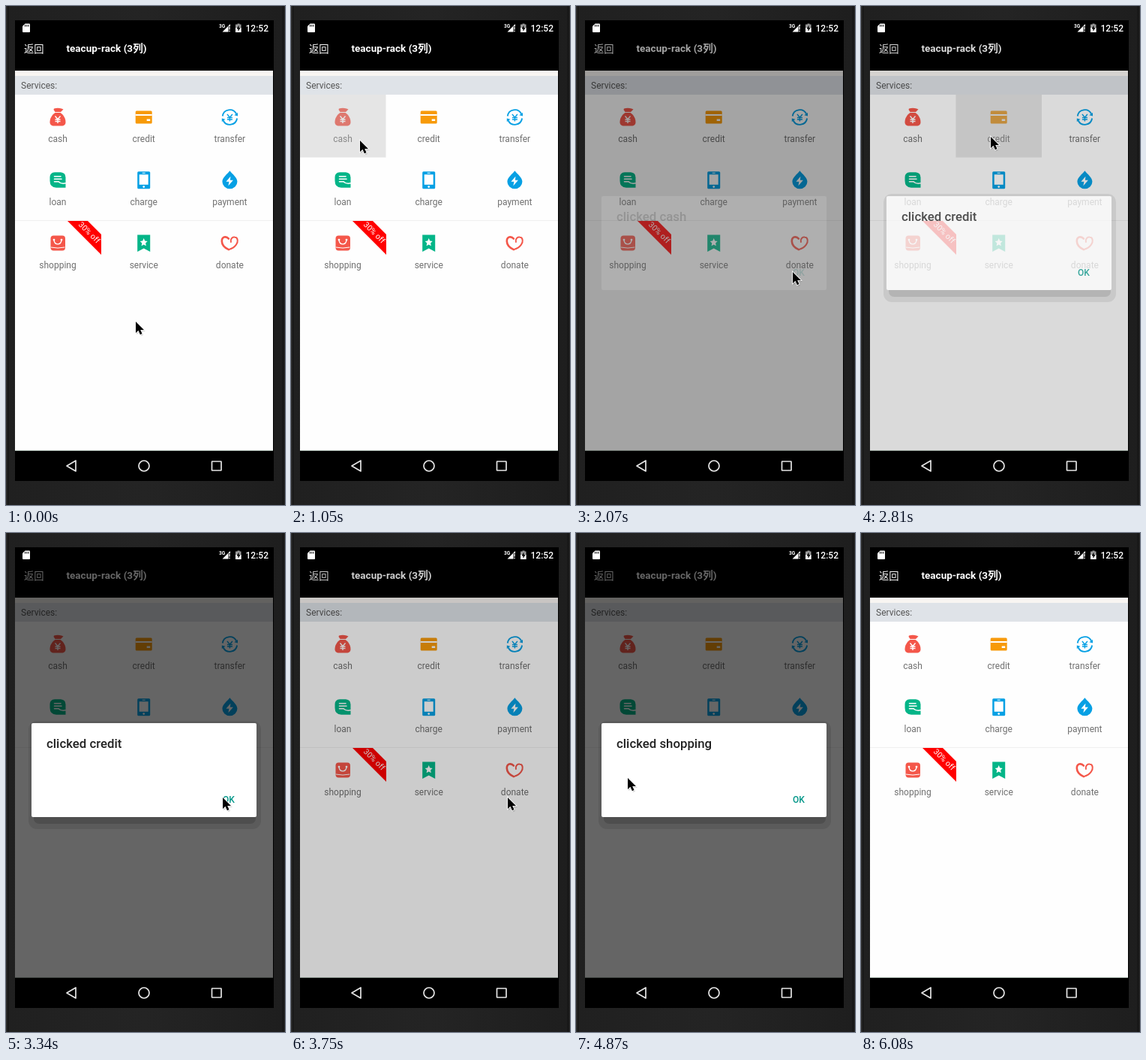
Animation, 372 px wide and 664 px high, one loop 6.44 s. Source, as an HTML page:

```html
<!DOCTYPE html>
<html lang="en">
<head>
<meta charset="utf-8">
<title>Grid demo</title>
<style>
html, body { margin: 0; width: 100%; height: 100%; overflow: hidden; background: #1f1f1f; }
svg { display: block; width: 372px; height: 664px; font-family: Roboto, sans-serif; }
.label { font-size: 12px; fill: #707070; text-anchor: middle; }
.cjk { font-family: "Noto Sans CJK SC", "Noto Sans CJK", sans-serif; }
.red { fill: #f4574a; }
.orange { fill: #f79a0a; }
.blue { fill: #06a0e4; }
.green { fill: #04b588; }
.white { fill: #fff; }
.line { fill: none; stroke: #fff; stroke-linecap: round; }
.medium { font-weight: 500; }
</style>
</head>
<body>
<svg viewBox="0 0 372 664">
  <defs>
    <linearGradient id="bezel">
      <stop offset="0" stop-color="#2a2a2a"/>
      <stop offset=".004" stop-color="#2a2a2a"/>
      <stop offset=".006" stop-color="#101010"/>
      <stop offset=".01" stop-color="#202020"/>
      <stop offset=".5" stop-color="#242424"/>
      <stop offset=".988" stop-color="#1e1e1e"/>
      <stop offset=".994" stop-color="#141414"/>
      <stop offset="1" stop-color="#2a2a2a"/>
    </linearGradient>
    <path id="yen" d="M-3.5-4.5L0-.3 3.5-4.5M0-.3V5M-3.5 0H3.5M-3.5 2.5H3.5" fill="none" stroke-width="1.4"/>
  </defs>

  <rect width="372" height="664" fill="url(#bezel)"/>
  <rect x="12" y="19" width="345" height="613"/>

  <!-- status bar -->
  <path class="white" d="M25.5 23.5H31q1 0 1 1v9.500q0 1-1 1H23q-1 0-1-1V27z"/>
  <path d="M25.500 25v2.500M27.700 25v2.500M29.900 25v2.500" stroke="#000" stroke-width="1"/>
  <text class="white" x="284" y="29" font-size="6.500" font-weight="700">3G</text>
  <path d="M299 24v10.500H288.500z" fill="#fff"/>
  <path d="M296.500 27h3v8h-3z"/>
  <path d="M298 27.500v4M298 32.800v1.500" stroke="#fff" stroke-width="1.300"/>
  <path d="M308.500 23.500h3v1h2v10.500h-7.500V24.500h2.500z" fill="#999"/>
  <path d="M306 29h7.500v6H306z" fill="#fff"/>
  <path d="M310.500 25.500l-3 5h2v3.500l3-5h-2z"/>
  <text class="white medium" x="319.500" y="34" font-size="12">12:52</text>

  <!-- app header and list -->
  <text class="white cjk" x="24" y="61.500" font-size="13.300" lang="zh">返回</text>
  <text class="white" x="80.500" y="61" font-size="13.500" font-weight="700">teacup-rack (3<tspan class="cjk">列</tspan>)</text>
  <rect x="12" y="86" width="344" height="506" fill="#fefefe"/>
  <rect x="12" y="86" width="344" height="7" fill="#f8f5f2"/>
  <rect x="12" y="93" width="344" height="25" fill="#dfe3e8"/>
  <text x="20" y="110" font-size="12" fill="#555">Services:</text>
  <rect x="12" y="285" width="344" height="1" fill="#efefef"/>
  <rect x="12" y="591" width="344" height="1" fill="#b8c6bd"/>

  <!-- icons, each drawn around its own centre -->
  <g id="icons">
    <g>
      <path class="red" d="M-5-11.500Q0-13 5-11.500L7.500-10.500 4-7H-3.500L-5.500-10z"/>
      <path class="red" d="M-3.500-6H3.500C8-3 10.500 2 10.500 6.500 10.500 10 8.500 11.500 5 11.500H-5C-8.500 11.500-10.500 10-10.500 6.500-10.500 2-8-3-3.500-6z"/>
      <use href="#yen" y="3" stroke="#fff"/>
    </g>
    <g>
      <rect class="orange" x="-11" y="-8.500" width="22" height="17" rx="1.500"/>
      <path class="white" d="M-11-4H11v2H-11zM4 2.500H8.500v2.500H4z"/>
    </g>
    <g stroke="#06a0e4">
      <path d="M-9.700-1.500A9.800 9.800 0 0 1 8.700-4.500M9.700 1.500A9.800 9.800 0 0 1-8.700 4.500" fill="none" stroke-width="1.900"/>
      <path class="blue" stroke="none" d="M10.600-6v4.500L6-2.800zM-10.600 6V1.500L-6 2.800z"/>
      <use href="#yen" y=".5"/>
    </g>
    <g>
      <path class="green" d="M-4-10.500H4Q10.500-10 10.500-3.500V10H-2Q-10.500 9.500-10.500 1V-4Q-10.500-10-4-10.500z"/>
      <path class="line" d="M-4.500-5H4M-4.500-1.500H5M-4.500 2H1Q4.500 5.500 10.500 4" stroke-width="1.600"/>
    </g>
    <g>
      <rect class="blue" x="-8.500" y="-11.500" width="17" height="23" rx="1.500"/>
      <path class="white" d="M-6-7.500H6V6H-6zM-2-10H2v1H-2z"/>
      <circle class="white" cy="8.800" r="1.400"/>
    </g>
    <g>
      <path class="blue" d="M0-12.500C3.500-8 10-3.500 10 2A10 9.500 0 0 1-10 2C-10-3.500-3.500-8 0-12.500z"/>
      <path class="white" d="M1-5L-5 2H-1L-2 7.500 4.500 0H.5z"/>
    </g>
    <g>
      <rect class="red" x="-9.500" y="-10" width="19.500" height="20" rx="4"/>
      <path class="line" d="M-5-4C-4 3 4 3 5-4" stroke-width="1.400"/>
      <path class="line" d="M-9 5.500Q0 7.500 9 5.500" stroke-width="1"/>
      <circle class="white" cx="-5" cy="-4.500" r="1.400"/>
      <circle class="white" cx="5" cy="-4.500" r="1.400"/>
    </g>
    <g>
      <path class="green" d="M-8.500-11H8.500V11.500L0 7-8.500 11.500z"/>
      <path class="white" d="M0-6.500L1.500-3 5-2.600 2.400 0 3.100 3.600 0 1.800-3.100 3.600-2.400 0-5-2.600-1.500-3z"/>
    </g>
    <g fill="none" stroke="#f4574a" stroke-linecap="round">
      <path d="M-1.500-6C-5-10-10.800-8.500-10.600-2.500-10.400 3-6 6.500-1.500 8.500" stroke-width="2.600"/>
      <path d="M1.500-1.500C.5-5 3-8.500 6.500-8 11-7.500 11.500-2 8.500 2 6 5.500 2 7.500-1.500 8.500" stroke-width="2"/>
    </g>
  </g>
  <path d="M82 286H109L127 304V331z" fill="#f00"/>
  <text class="white" transform="translate(111 301.500) rotate(45)" y="3.500" font-size="10.500" text-anchor="middle">30% off</text>
  <rect id="press" width="114.500" height="83.500" fill="#b6b6b6"/>

  <!-- scrim and dialog -->
  <rect id="scrim" x="12" y="40" width="344" height="552"/>
  <g id="dialog">
    <g id="shade">
      <rect x="30" y="250" width="310" height="144" rx="11" opacity=".1"/>
      <rect x="37" y="256" width="296" height="131" rx="7" opacity=".14"/>
    </g>
    <rect class="white" x="34" y="253" width="300" height="125" rx="2"/>
    <text class="medium" id="message" x="54" y="286" font-size="16.800" fill="#212121"></text>
    <text class="medium" x="289" y="359" font-size="12" fill="#009688">OK</text>
  </g>

  <!-- navigation bar -->
  <rect x="12" y="592" width="345" height="40"/>
  <g fill="none" stroke="#e4e4e4" stroke-width="1.700">
    <path d="M81 612L93 605V619z" stroke-linejoin="round"/>
    <circle cx="184" cy="612" r="7"/>
    <rect x="274.500" y="606" width="12.500" height="12" rx=".5"/>
  </g>

  <g id="cursor">
    <path d="M1 2V17L5 14 7 19 10 18 8 13H13z" opacity=".16"/>
    <path d="M0 0V15L3.500 11.800 5.900 17.200 8.500 16.100 6.200 10.900H11z" stroke="#fff" stroke-width="1.600" paint-order="stroke"/>
  </g>
</svg>
<script>
const LOOP = 6440;
const LABELS = ["cash", "credit", "transfer", "loan", "charge", "payment", "shopping", "service", "donate"];
const byId = id => document.getElementById(id);
const [press, scrim, dialog, shade, message, cursor] =
  ["press", "scrim", "dialog", "shade", "message", "cursor"].map(byId);
const clamp = x => Math.min(1, Math.max(0, x));
const ramp = (t, start, length) => clamp((t - start) / length);

// Bursts of motion: first change, last change, number of changes
const BURSTS = [
  [290, 750, 9], [1050, 1680, 12], [1730, 1790, 2], [1960, 2570, 12], [2750, 3340, 11],
  [3640, 4280, 12], [4580, 5210, 11], [5270, 5270, 1], [5560, 6080, 10]
];
// Pointer path: time, x, y
const PATH = [
  [0, 173, 420], [260, 173, 420], [750, 92, 179], [1050, 92, 179], [1270, 89, 203],
  [1680, 271, 355], [1790, 279, 360], [1930, 279, 360], [2000, 289, 354], [2075, 289, 354],
  [2570, 173, 174], [2815, 173, 174], [3340, 289, 352], [3760, 289, 352],
  [4280, 69, 326], [4880, 69, 326], [5210, 290, 360], [5270, 306, 357],
  [5620, 306, 357], [6030, 262, 639]
];
const POINTER_GONE = 6070;
// Clicked cell, press time, dialog leave time
const CLICKS = [[0, 1050, 1990], [1, 2750, 3622], [6, 4580, 5560]];

const cellX = i => 69 + (i % 3) * 114.7;
const cellY = i => Math.floor(i / 3) * 83.8;

[...byId("icons").children].forEach((icon, i) => {
  icon.setAttribute("transform", `translate(${cellX(i)} ${148 + cellY(i)})`);
  const label = document.createElementNS("http://www.w3.org/2000/svg", "text");
  label.setAttribute("class", "label");
  label.setAttribute("x", cellX(i));
  label.setAttribute("y", Math.round(181 + cellY(i)));
  label.textContent = LABELS[i];
  icon.after(label);
});

// Hold the picture between changes
function snap(t) {
  let held = 0;
  for (const [first, last, count] of BURSTS) {
    if (t < first) break;
    const gap = (last - first) / Math.max(1, count - 1);
    held = t >= last ? last : first + Math.floor((t - first + 10) / gap) * gap;
  }
  return held;
}

function pointerAt(t) {
  const next = PATH.findIndex(p => p[0] > t);
  if (next < 0) return PATH[PATH.length - 1].slice(1);
  const [t0, x0, y0] = PATH[next - 1];
  const [t1, x1, y1] = PATH[next];
  const u = (t - t0) / (t1 - t0);
  const e = u * u * (3 - 2 * u);
  return [x0 + (x1 - x0) * e, y0 + (y1 - y0) * e];
}

function render(time) {
  const t = snap(time % LOOP);
  const [x, y] = pointerAt(t);
  cursor.setAttribute("transform", `translate(${x.toFixed(1)} ${y.toFixed(1)})`);
  cursor.style.opacity = t < POINTER_GONE ? 1 : 0;

  let dim = 0, show = 0, lift = 0, held = 0;
  const click = CLICKS.findLast(c => t >= c[1]);
  if (click) {
    const [cell, down, leave] = click;
    const enter = down + 12;
    const out = ramp(t, leave, 92);
    dim = 0.6 * (ramp(t, enter, 200) - ramp(t, leave, 200));
    show = ramp(t, enter, 62) * (1 - out);
    lift = 1 - ramp(t, leave, 50);
    held = 0.35 * (1 - ramp(t, down + 100, 100));
    message.textContent = "clicked " + LABELS[cell];
    press.setAttribute("x", 12 + (cell % 3) * 114.5);
    press.setAttribute("y", 118 + cellY(cell));
  }
  scrim.style.opacity = dim;
  dialog.style.opacity = show;
  shade.style.opacity = lift;
  press.style.opacity = held;
}

const start = performance.now();
function tick() {
  render(performance.now() - start);
  requestAnimationFrame(tick);
}
tick();
</script>
</body>
</html>
```
